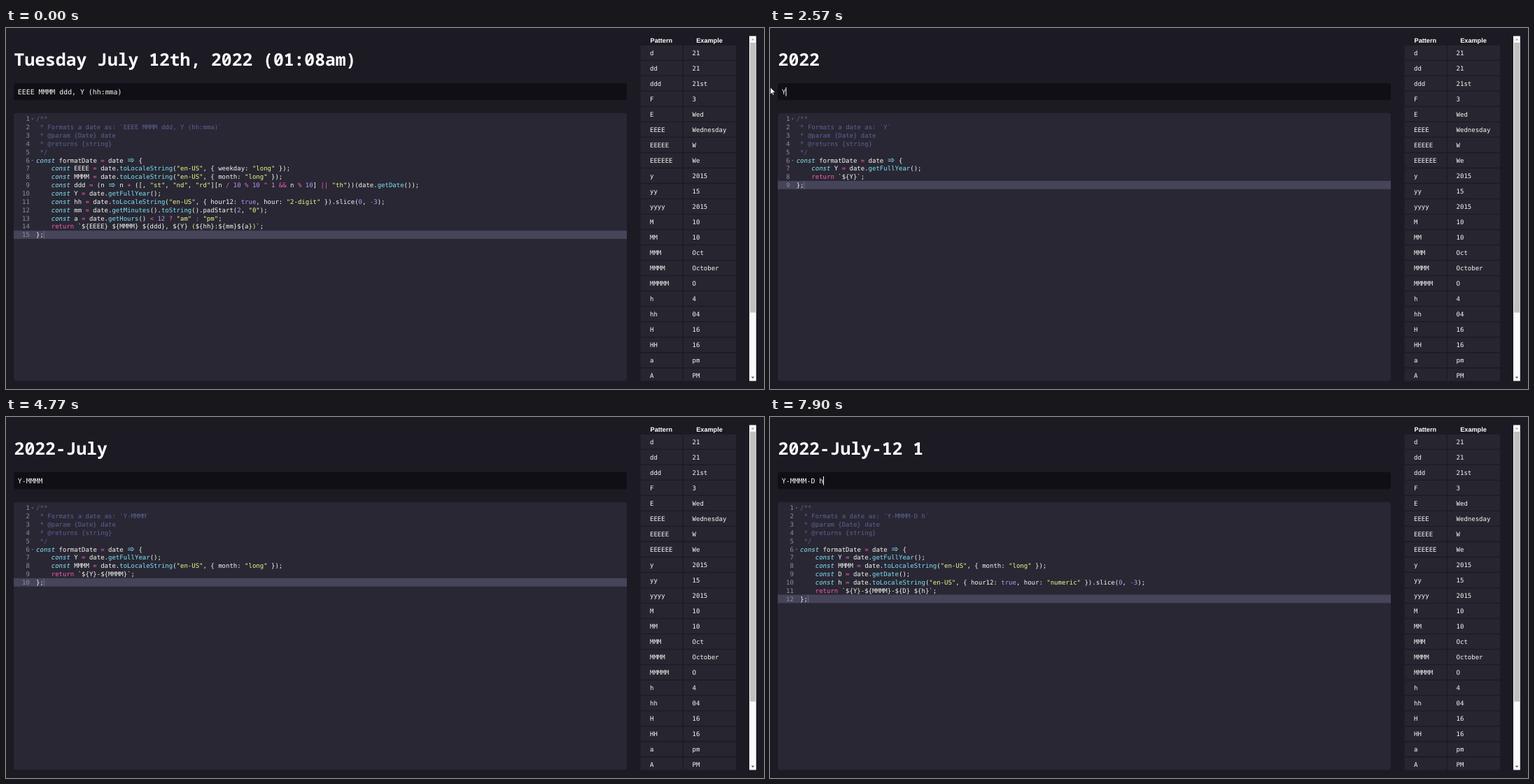
Write an HTML page that moves like this. It is 1083 px wide and 517 px high and loops after 8000 ms.

```html
<!DOCTYPE html>
<html lang="en">
<head>
<meta charset="utf-8">
<title>Date format generator</title>
<style>
  html, body { margin: 0; width: 100%; height: 100%; overflow: hidden; background: #1c1b24; }
  svg { display: block; width: 100vw; height: 100vh; }
  text { white-space: pre; fill: #f8f8f2; font: 9px "DejaVu Sans Mono", monospace; text-rendering: geometricPrecision; }
  #title { font: bold 24.7px "Noto Sans Mono", monospace; fill: #fff; }
  #field { font-size: 9.89px; }
  .head { font: bold 9.15px "Liberation Sans", Arial, sans-serif; fill: #fff; text-anchor: middle; }
  .num { fill: #909094; text-anchor: end; }
  .comment { fill: #5f6098; }
  .type { fill: #8be9fd; font-style: italic; }
  .call { fill: #7fe3f5; }
  .op { fill: #fa5cb4; }
  .str { fill: #f1fa8c; }
  .const { fill: #bd93f9; }
</style>
</head>
<body>
<svg viewBox="0 0 1083 517" preserveAspectRatio="none">
  <rect width="1083" height="517" fill="#1c1b24"/>
  <text id="title" x="11.6" y="54"></text>
  <rect x="11" y="79" width="876" height="24.3" rx="3" fill="#100f16"/>
  <rect id="sel" y="85" height="12.6" fill="#4b4a5c"/>
  <text id="field" x="16.8" y="94.7"></text>
  <rect id="caret" y="85" width="1" height="12.6" fill="#fff"/>
  <rect x="11" y="121.7" width="876" height="383.8" rx="4" fill="#282733"/>
  <g id="code"></g>
  <g id="table"></g>
  <rect y="505.5" x="900" width="150" height="12" fill="#1c1b24"/>
  <g id="bar">
    <rect x="1062" y="11.5" width="9.8" height="494" fill="#fafafa"/>
    <rect x="1063" y="21" width="8" height="386.5" fill="#c1c1c1"/>
    <path d="M1064.8 17.6l2.2-2.6 2.2 2.6z" fill="#a3a3a3"/>
    <path d="M1064.8 499.4l2.2 2.6 2.2-2.6z" fill="#505050"/>
  </g>
  <path id="arrow" d="M0 0v10l2.3-2.1 1.5 3.4 1.6-.7-1.5-3.3h3.2z" fill="#fff" stroke="#000" stroke-width=".6"/>
  <path id="beam" d="M-2-5.5h4M0-5.5v11M-2 5.5h4" fill="none" stroke="#fff" stroke-width=".9"/>
</svg>
<script>
const LOOP = 8000;
const CHAR = 5.417, LINE = 11.86, FIELD_X = 16.8, FIELD_CHAR = 5.95;
const FULL = 'EEEE MMMM ddd, Y (hh:mma)';
const $ = id => document.getElementById(id);
const esc = s => s.replace(/&/g, '&amp;').replace(/</g, '&lt;');
const locale = o => `date.toLocaleString("en-US", { ${o} })`;

// pattern part: [displayed value, generated expression]
const PARTS = {
  EEEE: ['Tuesday', locale('weekday: "long"')],
  MMMM: ['July', locale('month: "long"')],
  MMM: ['Jul', locale('month: "short"')],
  MM: ['07', locale('month: "2-digit"')],
  M: ['7', locale('month: "numeric"')],
  ddd: ['12th', '(n => n + ([, "st", "nd", "rd"][n / 10 % 10 ^ 1 && n % 10] || "th"))(date.getDate())'],
  D: ['12', 'date.getDate()'],
  Y: ['2022', 'date.getFullYear()'],
  hh: ['01', locale('hour12: true, hour: "2-digit"') + '.slice(0, -3)'],
  h: ['1', locale('hour12: true, hour: "numeric"') + '.slice(0, -3)'],
  mm: ['08', 'date.getMinutes().toString().padStart(2, "0")'],
  a: ['am', 'date.getHours() < 12 ? "am" : "pm"']
};
const PART_RE = /EEEE|M{1,4}|ddd|D|Y|hh?|mm|a/g;

// [time, pattern, caret shown]
const STEPS = [
  [0, FULL, 0], [2570, 'Y', 1], [2830, 'Y-', 1], [3370, 'Y-M', 1],
  [3570, 'Y-MM', 1], [3770, 'Y-MMM', 1], [4200, 'Y-MMMM', 1],
  [4770, 'Y-MMMM', 0], [5270, 'Y-MMMM', 1], [5370, 'Y-MMMM-', 1],
  [5630, 'Y-MMMM-D', 1], [6170, 'Y-MMMM-D', 0], [6700, 'Y-MMMM-D', 1],
  [6770, 'Y-MMMM-D ', 1], [7270, 'Y-MMMM-D ', 0], [7800, 'Y-MMMM-D ', 1],
  [7900, 'Y-MMMM-D h', 1]
];

const TOKENS = [
  ['str', /^"[^"]*"/],
  ['type', /^(const\b|=>)/],
  ['op', /^(return\b|:(?= ")|[=+\/%^&|<?-]+)/],
  ['const', /^(true\b|\d+)/],
  ['call', /^(toLocaleString|toString|get[A-Z]\w+)/],
  ['', /^(\w+|[^\w\s"]|\s+)/]
];

function tokenize(src) {
  const out = [];
  const tick = src.indexOf('`');
  let rest = tick < 0 ? src : src.slice(0, tick);
  while (rest) {
    for (let [kind, re] of TOKENS) {
      const m = rest.match(re);
      if (!m) continue;
      // an object key's colon stays plain
      if (m[0] === ':' && !src.slice(0, src.length - rest.length).endsWith(' ')) kind = '';
      out.push([kind, m[0]]);
      rest = rest.slice(m[0].length);
      break;
    }
  }
  if (tick >= 0)
    for (const s of src.slice(tick).match(/\$\{\w+\}|;|[^$;]+/g))
      out.push([/^[$;]/.test(s) ? '' : 'str', s]);
  return out;
}

const label = (x, y, s, cls = '') =>
  `<text x="${x.toFixed(2)}" y="${y.toFixed(2)}" class="${cls}">${esc(s)}</text>`;

function wideArrow(x, y) {
  return `<path d="M${x + 1} ${y - 1.3}h7M${x + 1} ${y + 1.3}h7M${x + 6.6} ${y - 3}l3 3-3 3" ` +
    'fill="none" stroke="#8be9fd" stroke-width=".85"/>';
}

function codeMarkup(pattern) {
  const keys = pattern.match(PART_RE);
  const lines = [
    '/**', ` * Formats a date as: \`${pattern}\``, ' * @param {Date} date', ' * @returns {string}', ' */',
    'const formatDate = date => {',
    ...keys.map(k => `    const ${k} = ${PARTS[k][1]};`),
    '    return `' + pattern.replace(PART_RE, k => '${' + k + '}') + '`;',
    '};'
  ];
  const shift = lines.length > 9 ? CHAR : 0;
  const left = 37.7 + shift;
  const top = 124.1 + LINE * (lines.length - 1);
  let out = `<rect x="11" y="${top}" width="876" height="${LINE}" fill="#454459"/>` +
    `<rect x="${left + 2 * CHAR}" y="${top + .4}" width=".8" height="11" fill="#77768a"/>`;
  lines.forEach((line, i) => {
    const y = 133.2 + LINE * i;
    out += label(28.5 + shift, y, String(i + 1), 'num');
    if (i === 0 || i === 5)
      out += `<path d="M${30.9 + shift} ${y - 3.6}h3l-1.5 1.7z" fill="#77768a"/>`;
    if (i < 5) {
      const lead = line.search(/\S/);
      out += label(left + lead * CHAR, y, line.slice(lead), 'comment');
      return;
    }
    let x = left;
    for (const [kind, s] of tokenize(line)) {
      if (s === '=>') out += wideArrow(x, y - 3.2);
      else if (s.trim()) out += label(x, y, s, kind);
      x += s.length * CHAR;
    }
  });
  return out;
}

function tableMarkup() {
  const rows = ('d 21,dd 21,ddd 21st,F 3,E Wed,EEEE Wednesday,EEEEE W,EEEEEE We,y 2015,yy 15,yyyy 2015,' +
    'M 10,MM 10,MMM Oct,MMMM October,MMMMM O,h 4,hh 04,H 16,HH 16,a pm,A PM').split(',');
  let out = label(936.3, 20.7, 'Pattern', 'head') + label(1005, 20.7, 'Example', 'head');
  rows.forEach((row, i) => {
    const [a, b] = row.split(' ');
    const y = 25 + 22.02 * i;
    out += `<path d="M906.5 ${y}h60v20.7h-60zM967.8 ${y}h75.4v20.7h-75.4z" fill="#272630"/>`;
    out += label(920, y + 13.5, a) + label(980.6, y + 13.5, b);
  });
  return out;
}

const clamp = v => Math.min(1, Math.max(0, v));
const ease = v => v * v * (3 - 2 * v);
const show = (id, on) => $(id).setAttribute('visibility', on ? 'visible' : 'hidden');

let shown = '';
function setPattern(pattern) {
  if (pattern === shown) return;
  shown = pattern;
  $('title').textContent = pattern.replace(PART_RE, k => PARTS[k][0]);
  $('field').textContent = pattern;
  $('code').innerHTML = codeMarkup(pattern);
}

function mouseAt(t) {
  const reach = ease(clamp((t - 970) / 200));
  const drag = ease(clamp((t - 1180) / 300));
  return [300 - 130 * reach - 169.5 * drag, 190 - 99 * reach - 6 * drag];
}

function render(t) {
  const [, pattern, caret] = STEPS.filter(s => s[0] <= t).pop();
  setPattern(pattern);
  show('caret', caret);
  $('caret').setAttribute('x', FIELD_X + pattern.length * FIELD_CHAR - .3);

  const [mx, my] = mouseAt(t);
  const visible = t >= 970 && t < 3570;
  const inField = mx > 11 && my > 79 && my < 103;
  show('arrow', visible && !inField);
  show('beam', visible && inField);
  $('arrow').setAttribute('transform', `translate(${mx} ${my})`);
  $('beam').setAttribute('transform', `translate(${mx} ${my})`);

  const from = Math.min(FULL.length, Math.max(0, Math.round((mx - FIELD_X) / FIELD_CHAR)));
  show('sel', t >= 1180 && t < 2570);
  $('sel').setAttribute('x', FIELD_X + from * FIELD_CHAR);
  $('sel').setAttribute('width', (FULL.length - from) * FIELD_CHAR);
}

$('table').innerHTML = tableMarkup();
const start = performance.now();
function tick() {
  render((performance.now() - start) % LOOP);
  requestAnimationFrame(tick);
}
tick();
</script>
</body>
</html>
```
